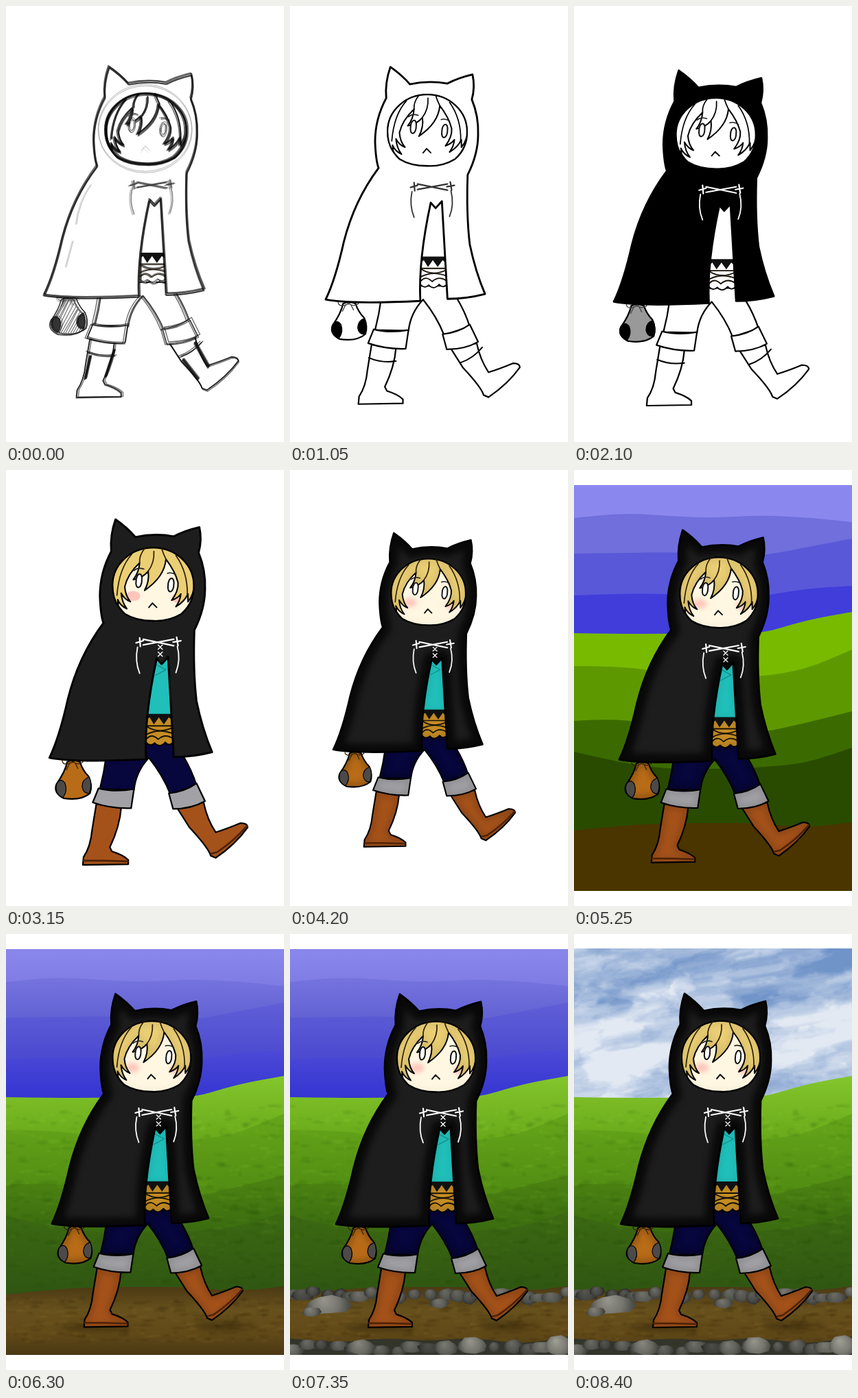
Recreate the animation shown at these times as an HTML page with a canvas. Size 405 by 636 pixels, loop 9.45 s.

```html
<!DOCTYPE html>
<html lang="en">
<head>
<meta charset="utf-8">
<title>Drawing steps</title>
<style>
html, body { margin: 0; width: 100%; height: 100%; overflow: hidden; background: #fff }
canvas { display: block }
</style>
</head>
<body>
<canvas id="stage" width="405" height="636"></canvas>
<script>
const W = 405, STEP = 1050, TOP = 21, BOTTOM = 614;
const c = document.getElementById('stage').getContext('2d');
const SKETCH = 0, LINE = 1, INK = 2, FLAT = 3, SHADED = 4;

// Each stage: horizontal scale and shift, vertical scale and shift, figure style, scenery level
const stages = [
  [1.018, -13.2, .99, 2.5, SKETCH, 0],
  [1.014, -17, 1.01, 1, LINE, 0],
  [1.018, -11.2, 1.004, 6.7, INK, 0],
  [1.035, -7.1, 1.035, -18, FLAT, 0],
  [.95, -1.6, .94, 10.2, SHADED, 0],
  [.993, -1.5, .996, 1, SHADED, 1],
  [.997, -1, .998, .5, SHADED, 2],
  [1, -1, .998, 1, SHADED, 3],
  [1, 0, 1, 0, SHADED, 4]
];

let seed = 1;
const rnd = (a = 0, b = 1) => {
  seed = (seed * 16807) % 2147483647;
  return a + (b - a) * seed / 2147483647;
};

const mix = (a, b, t) => a + (b - a) * t;
const hash = (x, y) => {
  const s = Math.sin(x * 127.1 + y * 311.7) * 43758.5453;
  return s - Math.floor(s);
};
function noise(x, y) {
  const ix = Math.floor(x), iy = Math.floor(y);
  const ease = t => t * t * (3 - 2 * t), u = ease(x - ix), v = ease(y - iy);
  return mix(mix(hash(ix, iy), hash(ix + 1, iy), u), mix(hash(ix, iy + 1), hash(ix + 1, iy + 1), u), v);
}
function fractal(x, y) {
  let sum = 0;
  for (let i = 0, amp = .5; i < 5; i++, amp *= .55, x *= 2, y *= 2) sum += amp * noise(x, y);
  return sum;
}

function ellipse(x, y, rx, ry, fill) {
  c.beginPath();
  c.ellipse(x, y, rx, ry, 0, 0, 7);
  c.fillStyle = fill;
  c.fill();
}

function gradient(y0, y1, ...colors) {
  const g = c.createLinearGradient(0, y0, 0, y1);
  colors.forEach((col, i) => g.addColorStop(i / (colors.length - 1), col));
  return g;
}

// ---- scenery: flat colour, soft top and bottom colours, heights of the upper edge ----
const bands = [
  ['#8a88ee', '#8a88ec', '#7e7ce4', [22, 22, 22, 22, 22, 22, 22]],
  ['#706fdc', '#7674de', '#6261d4', [70, 62, 67, 70, 66, 69, 76]],
  ['#5958d9', '#605fd6', '#4a49d0', [122, 121, 120, 122, 126, 113, 100]],
  ['#403dda', '#4c4ad6', '#3434d2', [183, 180, 181, 181, 185, 173, 169]],
  ['#77ba00', '#84c62c', '#68a81a', [238, 239, 239, 237, 240, 219, 207]],
  ['#5e9800', '#66a61a', '#4f8a12', [286, 286, 296, 300, 302, 291, 262]],
  ['#3b6b00', '#4d8512', '#3a6a10', [366, 361, 378, 385, 384, 369, 352]],
  ['#294b00', '#3c6a12', '#2f5512', [411, 427, 436, 436, 434, 428, 405]],
  ['#4a3400', '#4a3814', '#5a4418', [526, 519, 515, 515, 515, 522, 514]]
];

function fillBand(ys, fill) {
  const dx = W / 6;
  c.beginPath();
  c.moveTo(0, BOTTOM);
  c.lineTo(0, ys[0]);
  for (let i = 1; i < 6; i++)
    c.quadraticCurveTo(i * dx, ys[i], (i + .5) * dx, (ys[i] + ys[i + 1]) / 2);
  c.lineTo(W, ys[6]);
  c.lineTo(W, BOTTOM);
  c.fillStyle = fill;
  c.fill();
}

function clouds() {
  const h = 225, img = c.createImageData(W, h);
  for (let y = 0, p = 0; y < h; y++)
    for (let x = 0; x < W; x++, p += 4) {
      const warp = fractal(x / 60, y / 40 + 9);
      const n = fractal(x / 110 + warp, y / 42 + x / 260 + 3);
      const t = Math.max(0, Math.min(1, (n - .3) * 2.3 + y / h * .2));
      img.data[p] = mix(112, 226, t);
      img.data[p + 1] = mix(147, 233, t);
      img.data[p + 2] = mix(200, 243, t);
      img.data[p + 3] = 255;
    }
  c.putImageData(img, 0, TOP);
}

function grass() {
  c.save();
  c.filter = 'blur(1px)';
  for (let i = 0; i < 600; i++) {
    const y = rnd(250, 512);
    ellipse(rnd(0, W), y, rnd(2, 10), rnd(.7, 3),
      rnd() < .5 ? 'rgba(20,60,0,.10)' : `rgba(150,205,60,${.16 * (1 - (y - 250) / 290)})`);
  }
  c.restore();
}

function rock(x, y, rx, ry, light) {
  const g = c.createRadialGradient(x - rx * .2, y - ry * .6, 0, x, y, rx);
  const grey = v => `rgb(${v},${v},${v * .94})`;
  g.addColorStop(0, grey(light));
  g.addColorStop(.6, grey(light * .78));
  g.addColorStop(1, grey(light * .5));
  c.beginPath();
  for (let i = 0; i < 9; i++) {
    const a = i * Math.PI * 2 / 9, r = rnd(.85, 1.1);
    c.lineTo(x + Math.cos(a) * rx * r, y + Math.sin(a) * ry * r);
  }
  c.closePath();
  c.fillStyle = c.strokeStyle = g;
  c.lineJoin = 'round';
  c.lineWidth = 2;
  c.fill();
  c.stroke();
}

function path(withRocks) {
  fillBand(bands[8][3], gradient(515, BOTTOM, '#4c3a14', '#66501c', '#624a18', '#4a3814'));
  c.save();
  c.filter = 'blur(1px)';
  for (let i = 0; i < 260; i++)
    ellipse(rnd(0, W), rnd(530, 595), rnd(2, 12), rnd(.6, 2), rnd() < .5 ? 'rgba(35,22,5,.2)' : 'rgba(150,115,45,.17)');
  c.filter = 'blur(4px)';
  ellipse(130, 574, 52, 6, 'rgba(25,15,0,.35)');
  ellipse(318, 572, 45, 7, 'rgba(25,15,0,.3)');
  c.restore();
  if (!withRocks) return;
  for (let x = 4; x < W; x += rnd(13, 25)) rock(x, rnd(521, 531), rnd(9, 17), rnd(6, 9), rnd(85, 122));
  rock(55, 541, 32, 13, 150);
  rock(31, 551, 13, 6, 130);
  rock(218, 539, 14, 6, 118);
  fillBand([590, 597, 589, 594, 588, 599, 587], '#33342a');
  for (let x = 3; x < W; x += rnd(16, 28)) rock(x, rnd(599, 610), rnd(8, 20), rnd(6, 10), rnd(75, 125));
  rock(103, 603, 20, 11, 135);
  rock(266, 600, 21, 11, 150);
  rock(391, 601, 21, 14, 160);
}

function scenery(level) {
  if (!level) return;
  c.save();
  c.beginPath();
  c.rect(0, TOP, W, BOTTOM - TOP);
  c.clip();
  bands.forEach(([flat, upper, lower, ys], i) => {
    if (i == 4 && level == 4) clouds();
    const end = i < 8 ? Math.max(...bands[i + 1][3]) : BOTTOM;
    fillBand(ys, level == 1 ? flat : gradient(Math.min(...ys), end, upper, lower));
  });
  if (level > 1) {
    grass();
    path(level > 2);
  }
  c.restore();
}

// ---- figure ----
const shapes = {
  bag: 'M93 429 Q101 424 111 429 Q115 441 123 449 Q129 462 125 473 Q112 484 88 480 Q73 472 78 460 Q90 443 93 429Z',
  patches: 'M78 460 Q84 450 90 459 Q94 470 87 479 Q75 474 78 460Z M124 450 Q114 453 114 464 Q116 474 124 473 Q129 462 124 450Z',
  tie: 'M101 429 Q86 421 86 428 Q88 435 101 429 Q116 420 115 429 Q109 434 101 429 M97 430 L92 440 M104 430 L108 438',
  pants: 'M148 420 L200 403 L243 403 L256 420 Q269 442 275 462 L238 474 Q228 448 208 423 Q190 442 187 468 L139 467 Q145 444 148 420Z',
  bootL: 'M134 488 L169 493 Q167 520 153 549 L156 555 Q172 560 179 567 L179 573 L115 574 L116 563 Q126 548 128 525Z',
  bootR: 'M248 494 L285 486 Q290 510 302 528 Q318 523 337 515 Q347 515 347 521 Q330 545 302 564 L295 561 Q292 550 265 521Z',
  soles: 'M116 568 L145 568 L178 569 M296 558 L304 556 Q328 540 346 519',
  cuffL: 'M137 466 Q160 472 187 467 L183 494 Q155 495 129 486Z',
  cuffR: 'M236 473 Q258 471 275 459 L287 484 Q268 495 242 495Z',
  bootTops: 'M130 507 Q148 515 169 512 M262 514 Q280 508 293 492',
  shirt: 'M216 282 L237 280 L243 366 L204 366Z',
  belt: 'M204 363 L243 363 L243 400 Q237 408 231 401 Q223 410 216 402 Q210 408 204 401Z',
  trim: 'M204 361 L243 361 L243 372 L236 366 L229 376 L222 366 L215 376 L209 366 L204 370Z',
  beltLace: 'M204 378 L243 378 M205 379 Q222 390 242 380 M205 390 Q222 381 242 389 M205 396 Q212 388 221 397 Q231 388 242 396',
  cape: 'M161 87 Q153 110 155 132 Q139 162 139 195 Q140 222 144 233 Q109 280 94 340 Q82 394 68 423 Q104 430 204 425 Q201 366 219 283 L226 291 L235 281 Q239 354 243 422 Q270 422 297 415 Q283 382 275 343 Q270 300 272 243 Q287 213 287 185 Q288 158 278 134 Q283 116 279 98 Q258 103 243 111 Q216 106 189 112 Q178 99 161 87Z',
  face: 'M157 180 A57 53 0 0 1 271 180 Q272 204 254 220 Q236 231 214 230 Q190 230 174 220 Q157 204 157 180Z',
  hair: 'M157 180 A57 53 0 0 1 271 180 Q272 192 263 203 L263 192 Q258 203 246 210 Q252 202 253 192 Q249 198 240 201 Q250 188 249 176 Q245 160 232 143 Q230 168 202 187 Q209 174 207 160 Q200 169 186 172 Q194 162 195 148 Q178 164 174 182 Q175 195 182 203 Q174 200 169 191 Q170 204 177 213 Q168 209 164 200 L165 209 Q157 198 157 180Z',
  strands: 'M195 148 Q194 138 202 128 M232 143 Q228 135 226 128 M184 136 Q166 156 163 194 M246 138 Q263 162 262 194 M215 132 Q216 148 207 160',
  brows: 'M187 159 Q193 154 201 157 M234 163 Q240 161 246 165',
  eyes: 'M190 174 a4 8 8 1 0 8 -1 a4 8 8 1 0 -8 1Z M235 180 a4 8 8 1 0 8 -1 a4 8 8 1 0 -8 1Z',
  mouth: 'M208 211 L213 205 L219 211',
  laces: 'M200 256 L243 265 M200 264 L243 256 M190 261 L200 258 M195 254 L196 266 M242 260 L253 258 M247 253 L249 265',
  strings: 'M192 267 Q188 287 195 304 M248 266 Q253 285 246 303',
  ties: 'M221 264 l6 6 m0 -6 l-6 6 M221 274 l6 6 m0 -6 l-6 6',
  collar: 'M217 291 L232 299 L217 307',
  fold: 'M134 262 Q116 288 113 320 M108 345 L98 383',
  halo: 'M146 180 A67 66 0 1 1 280 180 A67 62 0 1 1 146 180Z',
  bootShade: 'M134 513 L127 545 M168 504 L156 542 M267 518 L288 546 M284 493 L303 528'
};
for (const k in shapes) shapes[k] = new Path2D(shapes[k]);

let style = SKETCH;

function line(name, color = '#000', width = 2) {
  const p = shapes[name];
  c.strokeStyle = color;
  c.lineWidth = width;
  if (style != SKETCH) return c.stroke(p);
  // loose pencil: several thin passes, each slightly off
  c.lineWidth = width * .6;
  for (let i = 0; i < 4; i++) {
    c.save();
    c.globalAlpha = .6;
    c.translate(rnd(-2, 2), rnd(-2, 2));
    c.rotate(rnd(-.004, .004));
    c.stroke(p);
    c.restore();
  }
}

function part(name, color, shade = 0, width = 2.2) {
  const p = shapes[name];
  c.fillStyle = style >= FLAT ? color : '#fff';
  c.fill(p);
  if (style == SHADED && shade) {
    c.save();
    c.clip(p);
    c.filter = 'blur(5px)';
    c.strokeStyle = `rgba(0,0,0,${shade})`;
    c.lineWidth = 8 + 24 * shade;
    c.stroke(p);
    c.restore();
  }
  line(name, '#000', width);
}

function fill(name, color) {
  c.fillStyle = color;
  c.fill(shapes[name]);
}

function hatchBag() {
  c.save();
  c.clip(shapes.bag);
  c.strokeStyle = '#777';
  c.lineWidth = 1.2;
  c.beginPath();
  for (let x = 50; x < 130; x += 3.5) {
    c.moveTo(x, 485);
    c.lineTo(x + 28 + rnd(-3, 3), 430);
  }
  c.stroke();
  c.restore();
}

function figure([sx, tx, sy, ty, mode]) {
  style = mode;
  const colored = mode >= FLAT, pencil = mode == SKETCH;
  c.save();
  c.transform(sx, 0, 0, sy, tx, ty);
  c.lineJoin = c.lineCap = 'round';

  part('bag', '#b96c17', .2);
  if (mode == INK) { fill('bag', '#999'); line('bag'); }
  if (pencil) hatchBag();
  fill('patches', colored ? '#4c4a49' : pencil ? '#333' : '#000');
  line('patches', '#000', 1.2);
  line('tie', colored ? '#3a2508' : '#444', 1.3);

  part('pants', '#07063d', .25);
  part('bootL', '#a5521a', .15);
  part('bootR', '#a5521a', .15);
  if (colored) line('soles', '#4d2208', 2.5);
  else line('bootTops');
  if (pencil) line('bootShade', '#111', 5);
  part('cuffL', '#a2a2a6', .12);
  part('cuffR', '#a2a2a6', .12);

  part('shirt', '#20bfba', .08, 1.5);
  if (colored) line('collar', '#168c8b', 1.3);
  part('belt', '#c58d25', .1, 1.8);
  fill('trim', '#111');
  line('beltLace', '#161006', 1.8);

  part('cape', '#1d1d1d', .7, 2.8);
  if (mode == INK) fill('cape', '#000');
  if (pencil) {
    line('fold', '#aaa', 1.2);
    line('halo', '#999', 1.2);
  }

  part('face', '#fff7e2', .03, pencil ? 5 : 2.4);
  if (colored) {
    c.save();
    c.filter = mode == SHADED ? 'blur(3px)' : 'none';
    ellipse(186, 195, 10, 7, 'rgba(255,150,150,.5)');
    ellipse(249, 198, 9, 7, 'rgba(255,150,150,.5)');
    c.restore();
  }
  part('hair', '#ebcf75', .08, pencil ? 3.2 : 2);
  line('strands', colored ? '#2e2008' : '#000', pencil ? 2.6 : 1.7);
  line('brows', '#222', 1.6);
  fill('eyes', '#fff');
  line('eyes', '#111', pencil ? 1.4 : 2);
  line('mouth', pencil ? '#aaa' : '#111', pencil ? 1 : 2);

  const thread = mode < INK ? '#333' : '#fff';
  line('laces', thread, 2.2);
  line('strings', pencil ? '#777' : thread, 1.8);
  if (colored) line('ties', thread, 1.4);
  c.restore();
}

const start = performance.now();
let shown = -1;

function tick() {
  const i = Math.floor((performance.now() - start) / STEP) % stages.length;
  if (i != shown) {
    shown = i;
    seed = 4271;
    c.fillStyle = '#fff';
    c.fillRect(0, 0, W, 636);
    scenery(stages[i][5]);
    figure(stages[i]);
  }
  requestAnimationFrame(tick);
}
tick();
</script>
</body>
</html>
```
